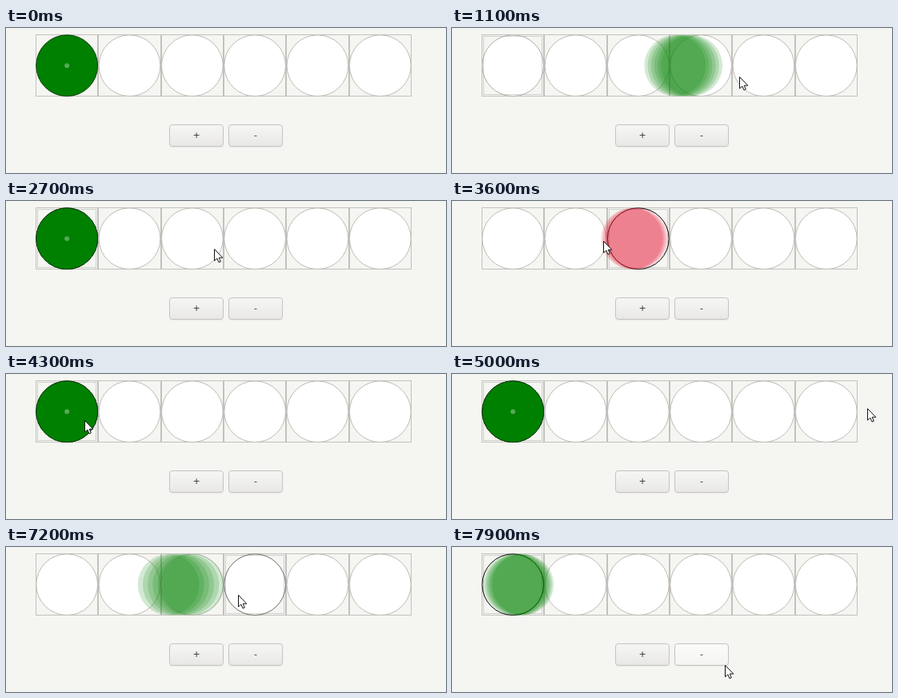
Write an HTML page with a canvas that moves like this. It is 550 px wide and 182 px high and loops after 8 s.

```html
<!DOCTYPE html>
<html lang="en">
<head>
<meta charset="utf-8">
<title>Sliding ball</title>
<style>
  html, body { margin: 0; width: 100%; height: 100%; overflow: hidden; background: #f5f5f2; }
  canvas { position: absolute; left: 0; top: 0; }
  .btn {
    position: absolute; top: 121px; width: 68px; height: 28px; box-sizing: border-box;
    border: 1px solid #c8c3c0; border-radius: 4px;
    background: linear-gradient(#f6f6f4, #e9e8e6);
    box-shadow: 0 1px 1px rgba(0, 0, 0, .06);
    font: 11px/26px "DejaVu Sans", sans-serif; text-align: center; color: #333;
  }
  .btn.hover { background: linear-gradient(#fbfbfa, #f4f4f2); }
  #plus { left: 204px; }
  #minus { left: 278px; }
</style>
</head>
<body>
<div class="btn" id="plus">+</div>
<div class="btn" id="minus">-</div>
<canvas id="stage" width="550" height="182"></canvas>
<script>
const ctx = document.getElementById('stage').getContext('2d');
const minus = document.getElementById('minus');

const LOOP = 8000, TRIP = 500, GHOSTS = 6, BLUR = 0.1, MAX_TRAIL = 31;
const CELLS = 6, LEFT = 37, TOP = 8, PITCH = 78.33, MID = 47.2, R = 38.4;
const GREEN = { rgb: '0,128,0', alpha: 0.675 };
const CRIMSON = { rgb: '220,20,45', alpha: 0.53 };

// Each visit runs from the first cell to the given one and back after a stay.
const visit = (start, cell, { stay = 30, color = GREEN } = {}) => [
  { start, from: 0, to: cell, color },
  { start: start + TRIP + stay, from: cell, to: 0, color }
];
const trips = [
  visit(200, 3, { stay: 280 }),
  visit(1595, 5),
  visit(3125, 2, { color: CRIMSON }),
  visit(5725, 5),
  visit(6895, 3)
].flat();

// pointer key points: time, x, y
const path = [
  [200, 300, 55], [900, 350, 60], [1900, 447, 69], [2700, 260, 60], [3600, 189, 50],
  [4600, 75, 60], [5000, 519, 43], [5700, 470, 50], [6200, 150, 53], [7200, 290, 60],
  [7900, 341, 148], [LOOP, 341, 148]
];

const lerp = (a, b, k) => a + (b - a) * k;
const clamp = v => Math.max(0, Math.min(1, v));
const swing = k => (1 - Math.cos(Math.PI * clamp(k))) / 2;
const edge = i => Math.round(LEFT + PITCH * i);
const centre = i => LEFT + PITCH * (i + 0.5);

function circle(x, r, fill, stroke) {
  ctx.beginPath();
  ctx.arc(x, MID, r, 0, Math.PI * 2);
  if (fill) { ctx.fillStyle = fill; ctx.fill(); }
  if (stroke) { ctx.strokeStyle = stroke; ctx.stroke(); }
}

function drawCells() {
  for (let i = 0; i < CELLS; i++) {
    ctx.strokeStyle = '#c2c1be';
    ctx.strokeRect(edge(i) + 0.5, TOP + 0.5, edge(i + 1) - edge(i) - 1, 77);
    circle(centre(i), R, '#fff', '#bfb9b3');
  }
}

function drawFocus(i, k) {
  ctx.setLineDash([1, 1]);
  ctx.strokeStyle = '#aaa';
  ctx.strokeRect(edge(i) + 2.5, TOP + 2.5, 73, 73);
  ctx.setLineDash([]);
  circle(centre(i), R, null, `rgba(0,0,0,${k * k})`);
}

function drawRest(i) {
  circle(centre(i), R, 'rgb(0,128,0)', '#063f06');
  circle(centre(i), 3, '#56a856');
}

function drawTrail({ from, to, color }, k) {
  const place = s => lerp(centre(from), centre(to), swing(s));
  const head = place(k);
  const lag = place(k - BLUR) - head;
  const trail = Math.sign(lag) * Math.min(Math.abs(lag), MAX_TRAIL);
  const alpha = 1 - Math.pow(1 - color.alpha, 1 / GHOSTS);
  for (let g = 0; g < GHOSTS; g++) {
    circle(head + trail * g / (GHOSTS - 1), R, `rgba(${color.rgb},${alpha})`);
  }
}

function pointerAt(t) {
  const n = path.findIndex(p => p[0] > t);
  if (n < 1) return null;
  const [t0, x0, y0] = path[n - 1], [t1, x1, y1] = path[n];
  const k = swing((t - t0) / (t1 - t0));
  return { x: Math.round(lerp(x0, x1, k)), y: Math.round(lerp(y0, y1, k)) };
}

const arrow = new Path2D('M.5 .5V15L3.8 12L6 17L8.3 16L6.2 11.2H10.8Z');
function drawPointer({ x, y }) {
  ctx.save();
  ctx.translate(x, y);
  ctx.fillStyle = '#fff';
  ctx.strokeStyle = '#111';
  ctx.fill(arrow);
  ctx.stroke(arrow);
  ctx.restore();
}

function draw(t) {
  ctx.clearRect(0, 0, 550, 182);
  drawCells();

  const move = trips.filter(m => m.start <= t).pop();
  if (!move) {
    drawRest(0);
  } else {
    const k = clamp((t - move.start) / TRIP);
    drawFocus(move.to, k);
    if (k < 1) drawTrail(move, k);
    else drawRest(move.to);
  }

  const p = pointerAt(t);
  minus.classList.toggle('hover', !!p && p.x >= 278 && p.x < 346 && p.y >= 121 && p.y < 149);
  if (p) drawPointer(p);
}

const begin = performance.now();
function tick() {
  draw((performance.now() - begin) % LOOP);
  requestAnimationFrame(tick);
}
tick();
</script>
</body>
</html>
```
